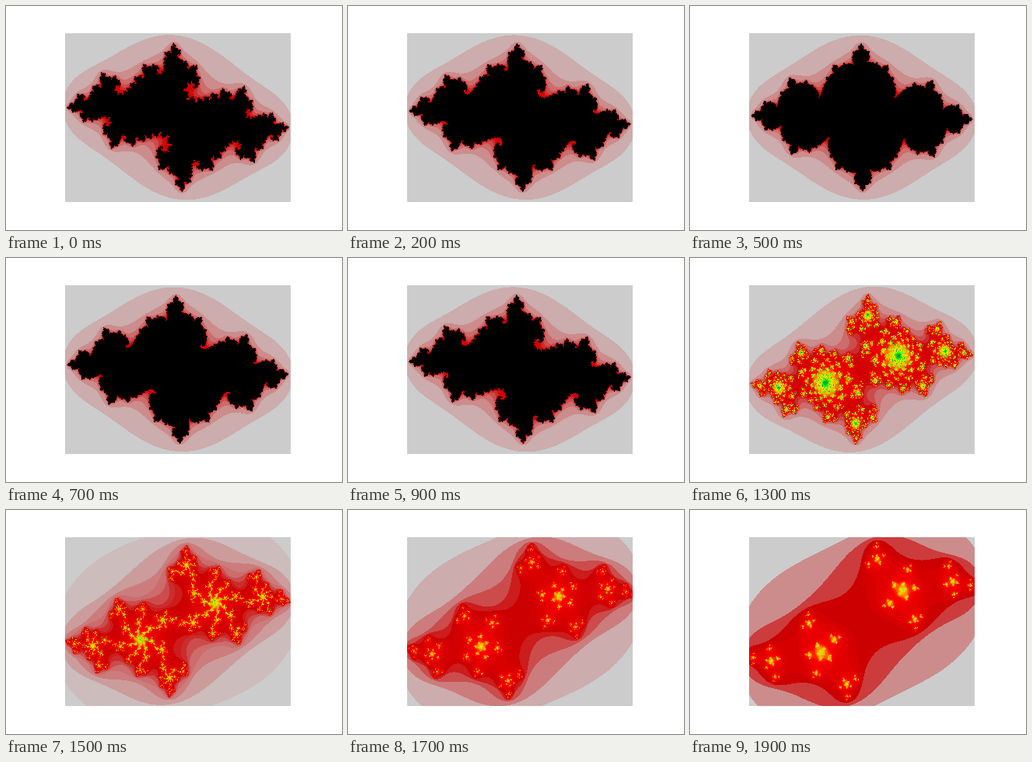
These frames come from a looping animation (432x288 px, 2 s). An HTML page with a canvas:

```html
<!DOCTYPE html>
<html lang="en">
<head>
<meta charset="utf-8">
<title>Julia sets</title>
<style>
  html, body { margin: 0; width: 100%; height: 100%; overflow: hidden; background: #fff; }
  canvas { display: block; width: 432px; height: 288px; }
</style>
</head>
<body>
<canvas id="stage" width="432" height="288"></canvas>
<script>
const ctx = document.getElementById('stage').getContext('2d');
const PLOT = { x: 76, y: 35, w: 290, h: 217 };
const STEP = 100, FRAMES = 20, LIMIT = 255, BREAKUP = 13;
const C_RE = -0.7;

// Imaginary part of c at key frames, linear in between
const C_IM = { 0: 0.215, 5: 0.038, 9: 0.17, 12: 0.16, 13: -0.317, 15: -0.44, 19: -0.77 };

// Key colours from fast to slow escape, placed in twentieths
const SPECTRUM = {
  0: '#ccc', 1: '#c00', 3: '#f00', 4: '#f90', 5: '#fc0', 7: '#bf0', 8: '#0f0',
  11: '#090', 12: '#0a8', 14: '#09d', 16: '#00d', 17: '#00a', 18: '#809', 20: '#000'
};

function makePalette() {
  const strip = document.createElement('canvas');
  strip.width = 256;
  strip.height = 1;
  const g = strip.getContext('2d');
  const fill = g.createLinearGradient(0.5, 0, 255.5, 0);
  for (const at in SPECTRUM) fill.addColorStop(at / 20, SPECTRUM[at]);
  g.fillStyle = fill;
  g.fillRect(0, 0, 256, 1);
  return new Uint32Array(g.getImageData(0, 0, 256, 1).data.buffer);
}

function cIm(frame) {
  const keys = Object.keys(C_IM).map(Number);
  const k = Math.max(1, keys.findIndex(key => key >= frame));
  const a = keys[k - 1], b = keys[k];
  return C_IM[a] + (C_IM[b] - C_IM[a]) * (frame - a) / (b - a);
}

function escapeTime(x, y, im) {
  for (let n = 0; n < LIMIT; n++) {
    const re = x * x - y * y + C_RE;
    y = 2 * x * y + im;
    x = re;
    if (x * x + y * y > 4) return n;
  }
  return LIMIT;
}

// The colour range shrinks as the set falls apart; the full range has coarser steps
function makeShades(frame) {
  const top = LIMIT * Math.pow(0.775, Math.max(0, frame - BREAKUP));
  const step = frame > BREAKUP ? 1 : 2;
  return n => {
    if (n >= top) return 255;
    const i = Math.min(255, Math.floor(256 * n / top));
    return i - i % step;
  };
}

function julia(frame, palette) {
  const { w, h } = PLOT;
  const im = cIm(frame), shade = makeShades(frame);
  const img = ctx.createImageData(w, h);
  const pixels = new Uint32Array(img.data.buffer);
  for (let j = 0, p = 0; j < h; j++) {
    // The plot is a fraction taller than its whole pixels, cut off at the top
    const y = 2 * (h - j - 0.5) / (h + 0.44) - 1;
    for (let i = 0; i < w; i++) {
      const x = 3 * (i + 0.5) / w - 1.5;
      pixels[p++] = palette[shade(escapeTime(x, y, im))];
    }
  }
  return img;
}

const palette = makePalette();
const frames = Array.from({ length: FRAMES }, (_, f) => julia(f, palette));

function show(time) {
  const frame = Math.floor(Math.max(0, time) / STEP) % FRAMES;
  ctx.putImageData(frames[frame], PLOT.x, PLOT.y);
}

ctx.fillStyle = '#fff';
ctx.fillRect(0, 0, 432, 288);
show(0);

const start = performance.now();
function tick() {
  show(performance.now() - start);
  requestAnimationFrame(tick);
}
requestAnimationFrame(tick);
</script>
</body>
</html>
```
